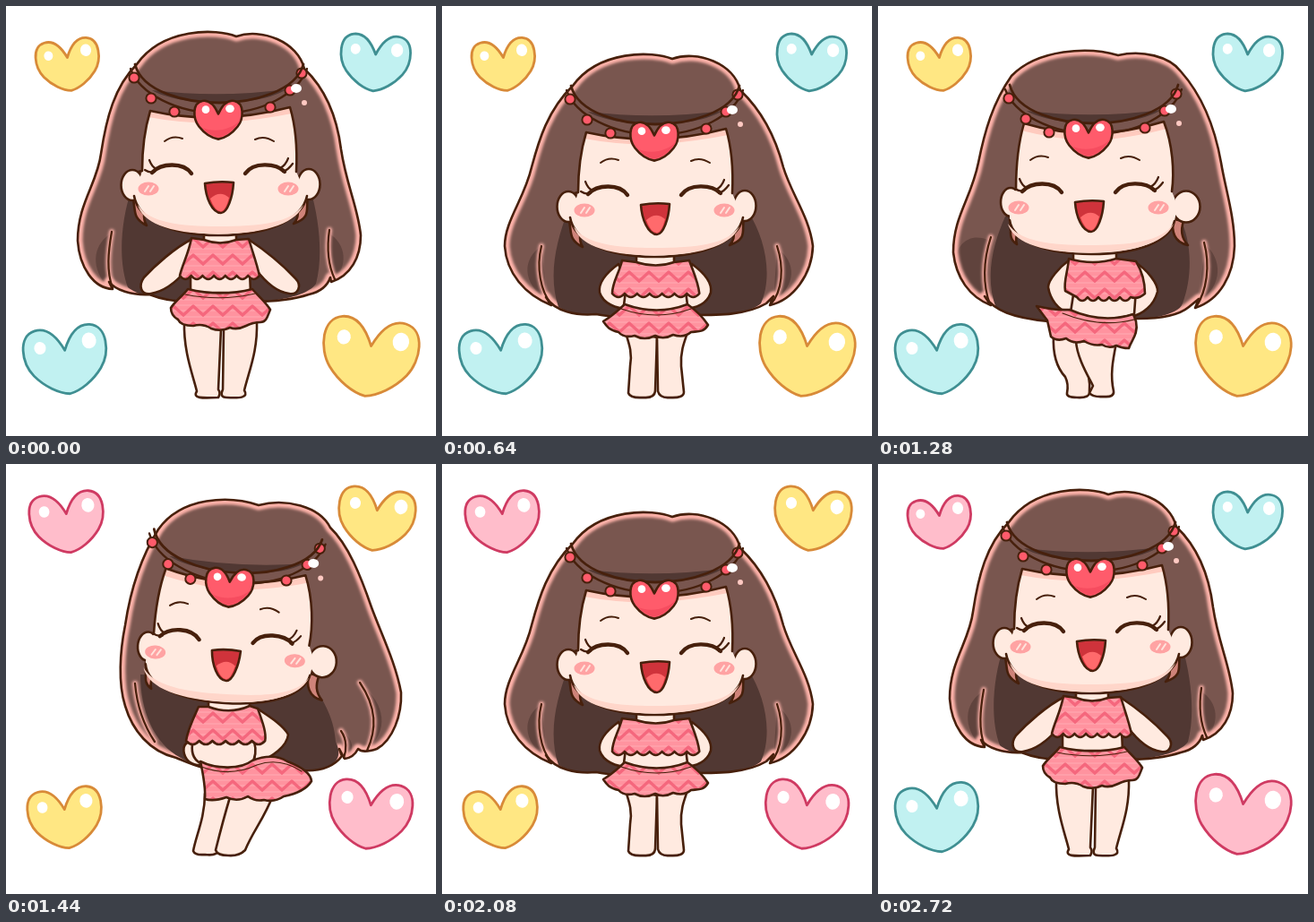
These frames come from a looping animation (480x480 px, 2.88 s). An HTML page:

```html
<!DOCTYPE html>
<html lang="en">
<head>
<meta charset="utf-8">
<title>Dancing girl with hearts</title>
<style>
html, body { margin: 0; width: 100%; height: 100%; overflow: hidden; background: #fff; }
svg { display: block; width: 100vw; height: 100vh; }
path, ellipse, circle { stroke-linejoin: round; stroke-linecap: round; }
.ink { stroke: #47200c; stroke-width: 2.6; }
.line { fill: none; stroke: #47200c; }
</style>
</head>
<body>
<svg id="stage" viewBox="0 0 480 480" xmlns="http://www.w3.org/2000/svg"></svg>
<script>
const STEP = 160;
// F front, C crouch, T twist, R lean; lower case is mirrored
const DANCE = 'FCTRCtrCTRCtrCTRCF';
const SKIN = '#ffeae0', BROWN = '#79564f', DARK = '#513833', RIM = '#ffb3aa', RED = '#ff5b6b';
const HEART = 'M0-12C-7-28-17-42-33-39C-54-35-53-3-40 14C-29 28-13 38 0 40C13 38 29 28 40 14C53-3 54-35 33-39C17-42 7-28 0-12Z';

const shape = (d, fill) => `<path class="ink" d="${d}" fill="${fill}"/>`;
const line = (d, w = 2.6) => `<path class="line" d="${d}" stroke-width="${w}"/>`;
const flat = (d, fill, more = '') => `<path d="${d}" fill="${fill}" ${more}/>`;
const oval = (x, y, rx, ry, fill, more = '') => `<ellipse cx="${x}" cy="${y}" rx="${rx}" ry="${ry}" fill="${fill}" ${more}/>`;
const group = (move, inner) => `<g transform="${move}">${inner}</g>`;
const hem = (n, w) => `q${w / 2} 8 ${w} 0`.repeat(n);

const defs = `<defs>
  <filter id="soft" x="-10%" y="-10%" width="120%" height="120%"><feGaussianBlur stdDeviation="1.5"/></filter>
  <pattern id="cloth" width="22" height="19" patternUnits="userSpaceOnUse" y="8">
    <rect width="22" height="19" fill="#ff939f"/>
    <path d="M0 3H22M0 9H22M0 16H22" stroke="#ffabb3" stroke-width="1.2"/>
    <path d="M-2 15.8L0 14L11 4L22 14L24 15.8" fill="none" stroke="#f5677d" stroke-width="3.4"/>
  </pattern></defs>`;

function hair(id, outline, dark, side, locks) {
  return `<clipPath id="hair${id}"><path d="${outline}"/></clipPath>
    <g clip-path="url(#hair${id})">
      ${flat(outline, BROWN)}
      ${flat(side, DARK, 'opacity=".6"')}
      <path d="${outline}" fill="none" stroke="${RIM}" stroke-width="11" filter="url(#soft)"/>
      <path d="${locks}" fill="none" stroke="${RIM}" stroke-width="6" filter="url(#soft)"/>
      ${flat(dark, DARK)}
    </g>${line(outline)}${line(locks, 2.3)}`;
}

const hairs = {
  F: hair('F',
    'M257 34C235 25 175 24 146 65C121 90 112 125 106 165C102 198 80 220 80 262C82 292 98 315 119 316L115 308C122 317 140 323 160 322C175 328 190 330 205 330L275 330C300 330 320 328 338 322C351 319 359 312 362 303L363 308C385 301 396 280 396 256C393 225 380 200 374 160C369 120 354 90 333 70C326 40 285 24 257 34Z',
    'M140 205C128 240 125 285 136 314C150 325 180 332 240 331C300 332 335 325 346 310C354 280 350 240 340 205Z',
    'M117 254C100 264 92 288 112 312L118 316ZM361 254C380 266 382 290 366 306Z',
    'M118 252C114 275 112 296 119 315M361 250C358 270 360 290 367 305'),
  C: hair('C',
    'M257 59C235 50 175 49 146 89C118 116 108 150 100 180C92 215 70 240 70 268C72 298 92 322 122 334L116 325C126 341 150 346 172 344C190 348 205 347 215 347L280 345C310 345 340 345 362 332L370 324L366 334C392 328 413 300 414 268C410 235 390 210 381 180C372 145 356 116 333 94C326 64 285 49 257 59Z',
    'M140 230C128 262 118 300 130 336C150 348 190 350 240 348C300 348 340 346 356 332C370 300 360 258 342 230Z',
    'M111 268C90 282 88 308 118 330ZM374 270C396 286 396 312 370 330Z',
    'M111 268C105 292 110 318 122 333M374 268C382 292 380 318 367 333'),
  T: hair('T',
    'M268 55C235 45 178 48 149 78C128 108 119 140 112 175C104 215 84 235 84 275C87 303 102 325 126 334L119 324C130 340 150 348 190 352L290 349C315 349 335 346 347 336L358 327L354 337C382 328 397 300 398 268C398 235 388 205 383 175C376 135 362 100 338 73C325 56 295 49 268 55Z',
    'M142 235C130 262 118 300 132 338C150 350 190 354 240 352C300 352 335 346 340 332C352 300 350 260 336 235Z',
    'M125 262C104 252 88 264 86 285C92 310 108 322 122 330ZM365 266C384 282 386 312 358 330Z',
    'M126 258C117 285 117 312 125 333M364 264C371 290 367 318 355 336'),
  R: hair('R',
    'M282 46C250 35 196 36 170 73C150 105 139 140 133 180C127 210 125 245 133 270C141 297 160 321 190 328C205 334 225 344 250 342L320 341C340 344 362 343 375 326L372 318L378 329C386 328 390 324 393 318C398 323 408 320 414 318C432 308 442 280 441 255C435 222 419 190 408 160C396 125 382 90 362 71C350 47 312 38 282 46Z',
    'M150 235C150 275 165 312 195 328C225 346 290 346 345 342C370 338 376 326 368 310C366 280 352 262 340 240Z',
    'M396 246C424 268 428 298 402 320C412 290 408 268 396 246ZM374 298C388 305 390 322 380 328Z',
    'M395 244C414 272 414 296 403 320M374 298C381 308 380 320 377 328M144 245C146 268 154 292 166 310')
};

const bodies = {
  F: shape('M199 352C198 385 208 410 213 430C208 438 218 438 237 437Q240 432 237 428L240 360Z', SKIN)
    + shape('M243 360L242 428Q238 437 246 437C262 438 271 437 266 429C272 405 281 385 280 352Z', SKIN)
    + shape('M208 260C188 270 166 290 154 303C147 313 151 323 162 321C178 318 190 308 200 296Z', SKIN)
    + shape('M270 260C288 272 308 288 323 304C331 312 326 323 316 321C300 319 288 306 279 294Z', SKIN)
    + shape('M206 296L206 320H273L272 296Z', SKIN)
    + shape('M221 250V262Q239 268 257 262V250Z', SKIN)
    + shape('M207 259C204 276 197 288 194 301' + hem(7, 12.7) + 'C280 287 275 274 271 260L257 261Q239 268 221 261Z', 'url(#cloth)')
    + shape('M203 316Q240 325 275 316C282 324 291 332 295 339C292 346 291 353 284 353Q276 353 268 357Q258 362 250 359Q240 364 229 360Q220 354 209 357Q195 357 192 350C185 346 184 340 184 337C190 328 197 324 203 316Z', 'url(#cloth)')
    + line('M200 322Q240 330 278 321', 1.2),
  C: shape('M204 362C208 375 213 386 210 402L208 432Q210 438 225 437Q237 438 238 430L240 370Z', SKIN)
    + shape('M240 370L241 430Q243 438 254 437Q270 438 270 431L267 402C266 386 270 376 275 362Z', SKIN)
    + shape('M197 288C186 296 174 308 176 320C180 332 194 338 208 338L210 318Z', SKIN)
    + shape('M279 288C290 296 302 308 300 320C296 332 284 338 268 338L268 318Z', SKIN)
    + shape('M205 318L203 334Q240 347 274 334L272 318Z', SKIN)
    + shape('M217 275V287Q239 294 259 287V275Z', SKIN)
    + shape('M201 284C198 298 190 308 190 321' + hem(7, 13.9) + 'C286 308 281 298 276 284L259 286Q239 293 217 286Z', 'url(#cloth)')
    + shape('M204 333Q240 346 274 333C284 340 293 350 297 356C292 365 285 363 278 364Q270 371 258 367Q247 373 238 368Q226 374 215 368Q203 371 197 364C187 362 184 358 180 352C190 346 196 340 204 333Z', 'url(#cloth)')
    + line('M200 338Q240 352 278 338', 1.2),
  T: shape('M196 368C195 386 198 402 209 414Q213 422 211 432Q210 437 222 437Q237 438 236 430C238 410 228 398 224 372Z', SKIN)
    + shape('M221 374C222 392 234 412 240 424L236 432Q240 437 252 436Q264 437 263 430C259 412 262 396 266 376Z', SKIN)
    + shape('M213 284C202 292 190 306 190 314C192 326 200 340 216 344L222 320Z', SKIN)
    + shape('M287 286C300 294 313 310 312 319C308 334 296 344 282 347L278 320Z', SKIN)
    + shape('M219 316L215 342Q250 356 286 344L288 316Z', SKIN)
    + shape('M218 272V284Q244 292 266 283V272Z', SKIN)
    + shape('M213 282C212 296 207 307 209 318L222 325' + hem(5, 12) + 'Q290 328 298 321C298 306 294 295 288 285L266 282Q240 290 213 282Z', 'url(#cloth)')
    + shape('M177 335Q198 340 214 339Q250 355 285 344L288 352C291 366 283 373 280 382Q272 382 266 379Q258 383 250 378Q240 380 230 374Q218 378 210 371Q200 375 193 369L189 351Z', 'url(#cloth)')
    + line('M206 343Q248 360 286 350', 1.2),
  R: shape('M222 368C222 395 212 415 209 432Q211 437 222 436Q236 438 238 430L250 372Z', SKIN)
    + shape('M250 372C243 395 238 415 234 431Q236 437 248 437Q260 438 267 431C275 411 288 396 298 370Z', SKIN)
    + shape('M282 274C294 282 310 292 315 302C314 314 298 328 278 334L276 314Z', SKIN)
    + shape('M204 310C195 314 198 326 204 332Q211 337 219 336L214 312Z', SKIN)
    + shape('M209 308C206 320 208 329 217 334C235 342 260 341 274 335Q281 324 277 310Z', SKIN)
    + shape('M226 260V273Q250 280 272 271V260Z', SKIN)
    + shape('M215 271C209 284 203 296 201 309' + hem(6, 14.7) + 'C291 300 286 287 281 273L272 270Q250 280 226 271Z', 'url(#cloth)')
    + shape('M217 332C235 341 262 341 275 331Q298 322 314 332Q340 342 341 354C335 364 320 369 310 371Q300 378 288 375Q278 377 270 371Q258 378 246 372Q232 377 222 374Q223 360 217 332Z', 'url(#cloth)')
    + line('M218 338Q250 350 280 336Q305 327 330 343', 1.2)
};

const cheek = x => oval(x, 204, 11.5, 7.5, '#ffa3a3')
  + `<path d="M${x - 4} 207l4-6M${x + 2} 207l4-6" stroke="#ffe3dc" stroke-width="2"/>`;

const brows = line('M177 151Q186 144 197 148M278 149Q288 144 299 151', 2);
const features = flat('M147 222C160 242 195 246 237 246C285 246 318 242 332 222C325 240 295 254.5 237 254.5C178 254.5 152 240 147 222Z', '#ffd6ca')
  + cheek(159) + cheek(315)
  + line('M163 186C173 175 198 174 207 187M267 187C276 174 301 175 311 185', 4.4)
  + line('M168 182Q163 180 160 172M166 185Q161 187 155 183M306 181Q312 178 315 170M309 185Q315 183 320 176', 2.2)
  + shape('M222 198Q238 195 254 197C253 214 247 231 240 231C230 231 223 214 222 198Z', '#cf333b')
  + flat('M228 215Q239 205 249 214Q245 229 240 229.5Q233 229 228 215Z', '#ff6a6c');

const bead = ([x, y]) => `<circle class="ink" cx="${x}" cy="${y}" r="5.6" fill="${RED}" style="stroke-width:2"/>`;
const band = flat('M163 94Q238 103 313 93C298 103 268 108 238 108C208 108 178 103 163 94Z', DARK)
  + line('M139 70C149 98 190 119 238 120C286 120 326 98 336 70', 2.3)
  + [[143, 80], [162, 103], [188, 118], [330, 75], [317, 94], [295, 113]].map(bead).join('')
  + line('M144 65C152 96 200 108 238 108C276 108 324 95 332 65', 2.8)
  + oval(324, 92, 6, 5, '#fff') + oval(333, 108, 3, 3, '#ffc9c2');

const gem = group('translate(237 127) scale(.54)',
  `<path class="ink" d="${HEART}" fill="${RED}" vector-effect="non-scaling-stroke"/>`
  + flat('M46 0C34 22 14 34 0 36C-12 34-24 26-34 16C-6 28 28 20 46 0Z', '#f64c5f')
  + oval(-26, -21, 8, 8, '#fff') + oval(24, -23, 9, 8, '#fff'));

const ear = (x, y, rx, ry) => oval(x, y, rx, ry, SKIN, 'class="ink"');
const strands = (...d) => d.map(p => shape(p, '#cf8379')).join('');

const front = strands('M141 213C146 226 139 236 157 245C151 236 156 230 154 222Z', 'M337 213C334 226 342 236 321 243C329 234 324 230 326 222Z')
  + ear(141, 200, 12.5, 17) + ear(338, 199, 12.5, 17)
  + flat('M161 117C154 140 152 165 152 184L143 212C147 236 180 256 237 256C298 256 331 236 336 212L324 185C325 165 325 140 317 113Q237 134 161 117Z', SKIN)
  + flat('M161 117Q237 134 317 113L319 120Q285 127 237 131Q195 131 159 124Z', '#ffcbbf')
  + line('M148 185L152 184C152 165 154 140 161 117Q237 134 317 113C325 140 325 165 324 185M143 212C147 236 180 256 237 256C298 256 331 236 336 212')
  + brows + features + band + gem;

const turned = strands('M147 238C150 250 144 259 155 266C152 257 158 252 155 246Z', 'M330 238C327 252 331 264 346 267C338 258 338 250 341 240Z')
  + ear(148, 219, 11, 16) + ear(344, 224, 15.5, 17.5)
  + flat('M163 131C156 155 154 182 154 205C149 212 147 226 147 239C150 262 186 277 238 277C292 277 326 262 331 240Q336 222 328 207C331 185 329 155 319 129Q240 154 163 131Z', SKIN)
  + flat('M163 131Q240 154 319 129L322 137Q290 146 238 151Q195 148 160 139Z', '#ffcbbf')
  + line('M154 205C154 182 156 155 163 131Q240 154 319 129C329 155 331 185 328 207M147 239C150 262 186 277 238 277C292 277 326 262 331 240')
  + group('translate(-2 21)', group('translate(-5 0)', brows) + features + group('translate(5 2)', band) + gem);

const heads = {
  F: front,
  C: group('translate(0 24)', front),
  T: turned,
  R: group('translate(9 -10) rotate(3.6 237 233)', turned)
};

const PAINT = { yellow: ['#ffe783', '#d88a38'], pink: ['#ffbdcb', '#cf3a62'], teal: ['#c1f1f1', '#3f8f92'] };
// centre x, centre y, width, tilt, colour
const beat = warm => [[69.5, 66, 72, -7, warm], [412, 63.5, 79, 4, 'teal'], [67, 395.5, 94, -7, 'teal'], [406, 392.5, 108, 7, warm]];
const rest = [[68.5, 65.5, 84, -7, 'pink'], [413, 62, 87, 7, 'yellow'], [66.5, 395.5, 84, -7, 'yellow'], [406, 392, 94, 7, 'pink']];

const heart = ([x, y, w, tilt, name]) => {
  const [fill, edge] = PAINT[name];
  return group(`translate(${x} ${y}) rotate(${tilt}) scale(${(w - 2) / 98})`,
    `<path d="${HEART}" fill="${fill}" stroke="${edge}" stroke-width="2.8" vector-effect="non-scaling-stroke"/>`
    + oval(-29, -18, 7, 7.5, '#fff') + oval(30, -20, 8.5, 9.5, '#fff'));
};

const layer = (id, inner) => `<g id="${id}" display="none">${inner}</g>`;
const girls = [...'FCTR'].map(k => layer('girl' + k, hairs[k] + bodies[k] + heads[k])).join('');
const sets = { yellow: beat('yellow'), pink: beat('pink'), rest };
const stage = document.getElementById('stage');
stage.innerHTML = defs
  + Object.keys(sets).map(k => layer('set' + k, sets[k].map(heart).join(''))).join('')
  + `<g id="dancer">${girls}</g>`;

const show = (id, on) => document.getElementById(id).setAttribute('display', on ? 'inline' : 'none');

let last = -1;
function draw(now) {
  const step = Math.floor(now / STEP) % DANCE.length;
  if (step !== last) {
    last = step;
    const pose = DANCE[step], key = pose.toUpperCase();
    for (const k of 'FCTR') show('girl' + k, k === key);
    document.getElementById('dancer').setAttribute('transform', pose === key ? '' : 'translate(480 0) scale(-1 1)');
    // the hearts restart their four-beat cycle after fifteen steps
    const set = ['yellow', 'rest', 'pink', 'rest'][step % 15 % 4];
    for (const k in sets) show('set' + k, k === set);
  }
}
const start = performance.now();
function tick() {
  draw(performance.now() - start);
  requestAnimationFrame(tick);
}
tick();
</script>
</body>
</html>
```
